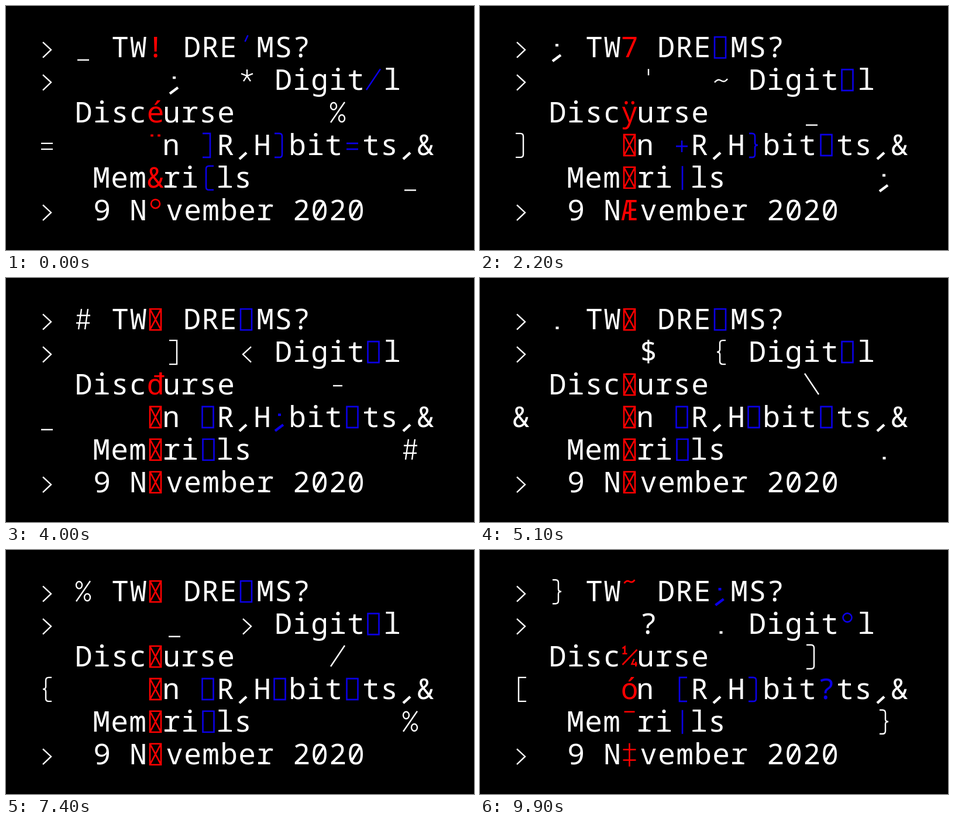
Write an HTML page that moves like this. It is 800 by 419 pixels and loops after 10 s.

```html
<!DOCTYPE html>
<html lang="en">
<head>
<meta charset="utf-8">
<title>Two Dreams?</title>
<style>
html, body { margin: 0; width: 100%; height: 100%; overflow: hidden; background: #000; }
svg { display: block; width: 100vw; height: 100vh; }
text { font: 400 49.5px "Noto Sans Mono", "DejaVu Sans Mono", monospace; text-anchor: middle; }
path { fill: none; }
</style>
</head>
<body>
<svg id="stage" viewBox="0 0 800 419"></svg>
<script>
const STEP = 100, COUNT = 100, PITCH = 31;
const WHITE = '#fff', RED = '#f00', BLUE = '#0b00e6';
const stage = document.getElementById('stage');
const baseline = row => 88.2 + row * 55.9;

// Thin marks drawn as strokes; origin is the cell centre on the baseline.
const MARKS = {
  '>': 'M-7-26L7-13L-7 .5',
  '<': 'M7-26L-7-13L7 .5',
  '_': 'M-10 4.5H10',
  '-': 'M-8-15H8',
  '=': 'M-10-20H10M-10-10H10',
  '+': 'M-10-15H10M0-25V-5',
  '±': 'M-10-17H10M0-27V-7M-10-5H10',
  '*': 'M0-35V-24L-10-28M0-24L10-28M0-24L-6-15M0-24L6-15',
  '^': 'M-13-22L0-34L13-22',
  '/': 'M-12 0L12-36',
  '\\': 'M12 0L-12-36',
  '|': 'M0-37V4',
  '[': 'M9-37H-4V4H9',
  ']': 'M-9-37H4V4H-9',
  '(': 'M9-37H1Q-4-37-4-32V-1Q-4 4 1 4H9',
  ')': 'M-9-37H-1Q4-37 4-32V-1Q4 4-1 4H-9',
  '{': 'M8-37H3Q-2-37-2-32V-21Q-2-17-7-17Q-2-17-2-13V-1Q-2 4 3 4H8',
  '}': 'M-8-37H-3Q2-37 2-32V-21Q2-17 7-17Q2-17 2-13V-1Q2 4-3 4H-8',
  "'": 'M0-36V-25',
  '"': 'M-5-36V-25M5-36V-25',
  '´': 'M3-38L-2-27',
  '`': 'M-6-36L7-32',
  '~': 'M-11-13Q-5-20 0-16Q6-12 11-19',
  '˜': 'M-9-31Q-5-37 0-34Q5-31 9-37',
  '¯': 'M-9-34H9',
  '¨': 'M-7-34h2v1h-2zM5-34h2v1h-2z',
  '°': 'M7.5-28A7.5 7.5 0 1 1-7.5-28A7.5 7.5 0 1 1 7.5-28',
  '¼': 'M-12-31L-8-34V-22M-12-22H-4M-12-3L13-29M8-13L4-4H13M11-8V0',
  '†': 'M0-36V4M-11-25H11',
  '‡': 'M0-36V4M-11-25H11M-11-7H11',
  '#': 'M-3-35L-8 0M8-35L3 0M-11-24H12M-12-11H11',
  '%': 'M-12 0L12-35M-2-28a5 6 0 1 1-10 0a5 6 0 1 1 10 0M12-7a5 6 0 1 1-10 0a5 6 0 1 1 10 0',
  '.': 'M-2.5-2.5h5',
  ':': 'M-2.5-2.5h5M-2.5-21h5',
  ',': 'M6-4L-6 7',
  ';': 'M-3-21h5M6-4L-8 6.5',
  open: 'M-9.5-35H9.5V1H-9.5Z',
  cross: 'M-9.5-35H9.5V1H-9.5ZM-9.5-35L9.5 1M9.5-35L-9.5 1'
};
// Strokes laid over letters of the fixed text: slashed zero, slab foot.
const DETAILS = { '0': 'M-6-8L6-28', r: 'M-12-2H4' };

function add(tag, attrs) {
  const el = document.createElementNS('http://www.w3.org/2000/svg', tag);
  for (const key in attrs) el.setAttribute(key, attrs[key]);
  return stage.appendChild(el);
}

// One cell that can show either a stroked mark or a letter.
function makeCell(row, x, color) {
  const y = baseline(row);
  const mark = add('path', { transform: `translate(${x} ${y})`, stroke: color });
  const letter = add('text', { x, y, fill: color });
  return ch => {
    const heavy = '.,:;'.includes(ch);
    mark.setAttribute('d', MARKS[ch] || '');
    mark.setAttribute('stroke-width', heavy ? 4.4 : color === WHITE ? 2.4 : 2.6);
    letter.textContent = MARKS[ch] ? '' : ch;
  };
}

// Fixed text: row, centre of first letter, letters.
[
  [0, 195, 'TW'], [0, 318, 'DRE'], [0, 443, 'MS?'],
  [1, 474, 'Digit'], [1, 660, 'l'],
  [2, 132.5, 'Disc'], [2, 283, 'urse'],
  [3, 282, 'n'], [3, 375, 'R'], [3, 438, 'H'], [3, 498, 'bit'], [3, 624, 'ts'], [3, 717, '&'],
  [4, 163, 'Mem'], [4, 283, 'ri'], [4, 374, 'ls'],
  [5, 164, '9 N'], [5, 288, 'vember 2020']
].forEach(([row, x, words]) => {
  const y = baseline(row);
  const xs = [...words].map((_, i) => x + i * PITCH);
  add('text', { x: xs.join(' '), y, fill: WHITE }).textContent = words;
  xs.forEach((cx, i) => {
    const d = DETAILS[words[i]];
    if (d) add('path', { d, transform: `translate(${cx} ${y})`, stroke: WHITE, 'stroke-width': 3.6 });
  });
});
[[0, 70, '>'], [1, 70, '>'], [5, 70, '>'], [3, 405, ','], [3, 685, ',']]
  .forEach(([row, x, ch]) => makeCell(row, x, WHITE)(ch));

const span = (from, to) =>
  Array.from({ length: to - from + 1 }, (_, i) => String.fromCharCode(from + i)).join('');
const PUNCT = span(0x21, 0x2f) + span(0x3a, 0x40) + span(0x5b, 0x60) + span(0x7b, 0x7e);
const LATIN = span(0x21, 0x7e) + '€‚ƒ„…†‡ˆ‰Š‹ŒŽ‘’“”•–—˜™š›œžŸ' + span(0xa1, 0x17f);
const ACCENTS = '´¸·*¯¨¦¬†‡';
const BRACKETS = ']^_`{|}~@[!"#$%&\'(),*-+';
const TAIL = '´·¯¨¦¬°';

// White cells walk through the punctuation for ever.
const white = [
  [0, 132, '_'], [1, 288, ';'], [1, 412, '*'],
  [2, 567, '%'], [3, 70, '='], [4, 691, '_']
].map(([row, x, first]) => ({ show: makeCell(row, x, WHITE), runs: [[0, 100, PUNCT, first]] }));

// Runs: first step, last step, alphabet, first sign. Outside them a box shows.
const red = [
  [0, [0, 31, LATIN, '!'], [94, 100, LATIN, '’']],
  [2, [0, 45, LATIN, 'é'], [80, 100, LATIN, '¨']],
  [3, [0, 15, LATIN, '¨'], [94, 100, LATIN, 'í']],
  [4, [0, 6, LATIN, '&'], [94, 100, LATIN, '©']],
  [5, [0, 33, LATIN, '°'], [94, 100, LATIN, '€']]
].map(([row, ...runs]) => ({ show: makeCell(row, 255.5, RED), runs, box: 'cross' }));

const blue = [
  [0, 410.5, [0, 9, ACCENTS, '´'], [94, 100, PUNCT, '+']],
  [1, 628, [0, 6, PUNCT, '/'], [94, 100, TAIL, '´']],
  [3, 345, [0, 22, BRACKETS, ']'], [94, 100, PUNCT, ';']],
  [3, 468, [0, 48, PUNCT, ')'], [94, 100, PUNCT, '#']],
  [3, 592, [0, 14, PUNCT, '='], [94, 100, PUNCT, '/']],
  [4, 346, [0, 30, PUNCT, '('], [94, 100, PUNCT, '\\']]
].map(([row, x, ...runs]) => ({ show: makeCell(row, x, BLUE), runs, box: 'open' }));

const cells = [...white, ...red, ...blue];

function signAt({ runs, box }, n) {
  const run = runs.find(([from, to]) => n >= from && n <= to);
  if (!run) return box;
  const [from, , signs, first] = run;
  return signs[(signs.indexOf(first) + n - from) % signs.length];
}

let last = -1;
function draw() {
  const step = Math.floor((performance.now() - start) / STEP) % COUNT;
  if (step !== last) {
    last = step;
    const n = step + (step > 88 ? 1 : 0); // one sign is skipped late in the loop
    cells.forEach(cell => cell.show(signAt(cell, n)));
  }
  requestAnimationFrame(draw);
}
const start = performance.now();
draw();
</script>
</body>
</html>
```
